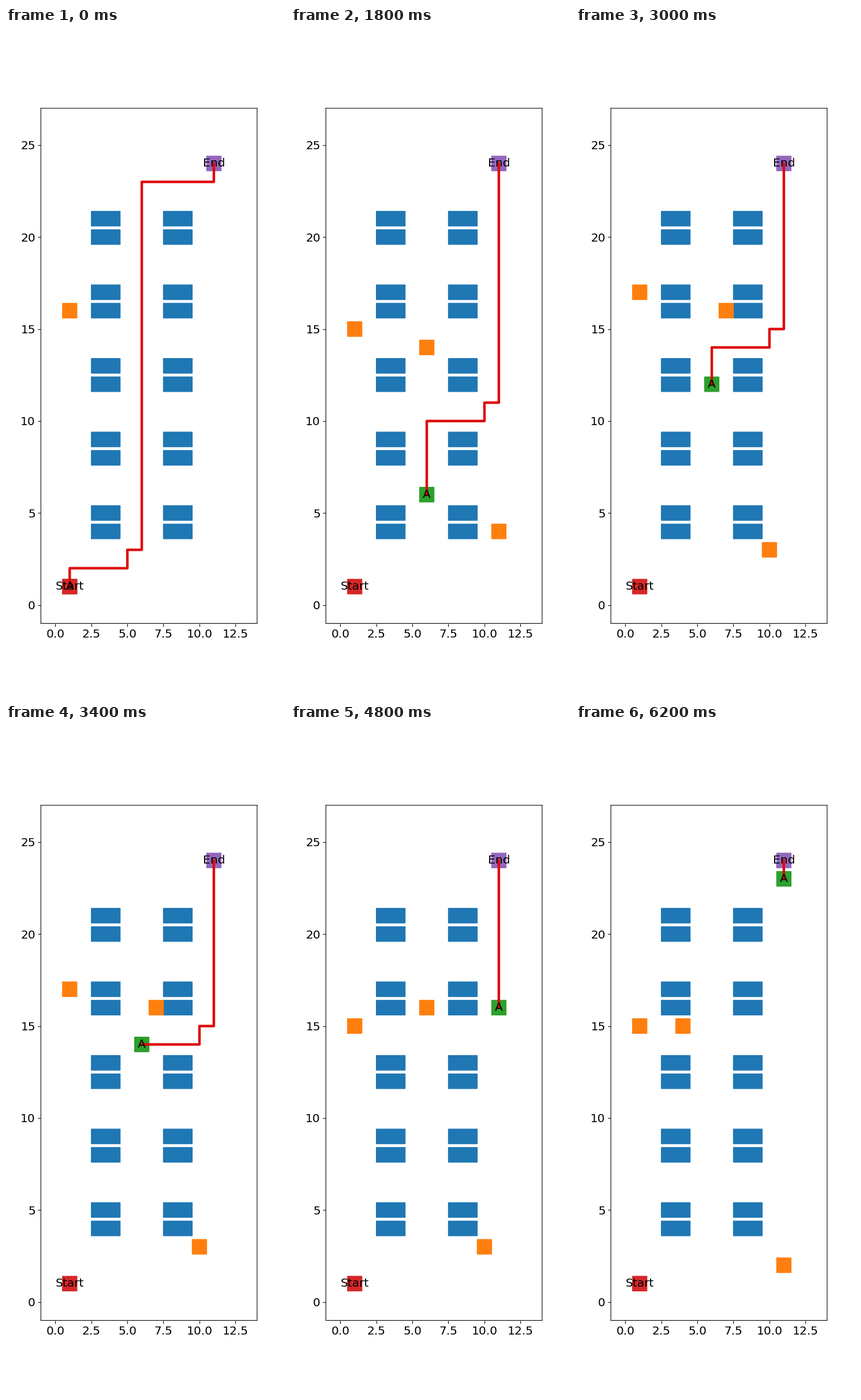
These frames come from a looping animation (483x1159 px, 6400 ms). A matplotlib script:

```python
import numpy as np
import matplotlib.pyplot as plt
from matplotlib.animation import FuncAnimation
from matplotlib.patches import Rectangle

FRAMES, INTERVAL = 32, 200
START, END = (1, 1), (11, 24)
CELL_H = 0.8

plt.rcParams.update({"font.family": "DejaVu Sans", "font.size": 15})
fig, ax = plt.subplots(figsize=(5, 11.998), dpi=96.6)
ax.set(xlim=(-1, 14), ylim=(-1, 27))


def block(center, color, width=1, zorder=1.0):
    x, y = center
    patch = Rectangle((x - width / 2, y - CELL_H / 2), width, CELL_H,
                      facecolor=color, edgecolor=color, linewidth=1, zorder=zorder)
    return ax.add_patch(patch)


def label(center, text):
    return ax.text(*center, text, ha="center", va="center")


# Each obstacle strolls between a few (frame, x, y) points on the grid
STROLLS = [
    [(4, 1, 16), (9, 1, 15), (15, 1, 17), (20, 2, 16), (24, 1, 15)],
    [(4, 6, 16), (9, 6, 14), (15, 7, 16), (20, 7, 16), (31, 4, 15)],
    [(4, 11, 5), (9, 11, 4), (20, 9, 2), (24, 10, 3), (31, 11, 2)],
]


def stroll(points, n):
    times, xs, ys = zip(*points)
    return tuple(int(np.interp(n, times, axis) + 0.5) for axis in (xs, ys))


def stairs(column, row):
    """Enter a column from the left with one step up just before it."""
    return [(column - 1, row), (column - 1, row + 1), (column, row + 1)]


def plan(pos, blocker):
    """Corners from pos to the end, crossing in the aisle below the blocker."""
    x, y = pos
    corners = [(1, 2)] + (stairs(6, 2) if x < 5 else [(6, 2)])
    if blocker:
        aisle = (blocker[1] - 3) // 4 * 4 + 2
        corners += [(6, aisle)] + stairs(11, aisle)
    else:
        corners += [(6, 23), (11, 23)]
    return [pos] + [c for c in corners if c[0] >= x and c[1] >= y] + [END]


def advance(corners, steps):
    """Cell reached after some unit steps along the corners."""
    x, y = corners[0]
    for cx, cy in corners[1:]:
        move = min(steps, abs(cx - x) + abs(cy - y))
        x, y = x + move * np.sign(cx - x), y + move * np.sign(cy - y)
        steps -= move
    return int(x), int(y)


# Replan before every step; the first move covers two cells
paths, pos = [], START
for n in range(FRAMES):
    paths.append(plan(pos, stroll(STROLLS[1], n) if n else None))
    pos = advance(paths[-1], 1 if n else 2)

for row in range(4, 21, 4):
    for y in (row, row + 1):
        for x in (3.5, 8.5):
            block((x, y), "tab:blue", width=2)

block(START, "tab:red", zorder=1.4)
block(END, "tab:purple", zorder=1.4)
label(START, "Start")
label(END, "End")

obstacles = [block(START, "tab:orange", zorder=1.2) for _ in STROLLS]
agent = block(START, "tab:green", zorder=1.3)
agent_label = label(START, "A")
trail, = ax.plot([], [], color="#de0a0a", linewidth=3.3)

# Keep edges at their true sub-pixel places
for artist in fig.findobj():
    artist.set_snap(False)


def place(patch, cell):
    patch.set_xy((cell[0] - 0.5, cell[1] - CELL_H / 2))


def update(n):
    for i, patch in enumerate(obstacles):
        patch.set_visible(i <= n)
        place(patch, stroll(STROLLS[i], n))
    path = paths[n]
    place(agent, path[0])
    agent_label.set_position(path[0])
    trail.set_data(*zip(*path))
    return [*obstacles, agent, agent_label, trail]


anim = FuncAnimation(fig, update, frames=FRAMES, interval=INTERVAL,
                     repeat=True, repeat_delay=0)
plt.show()
```
